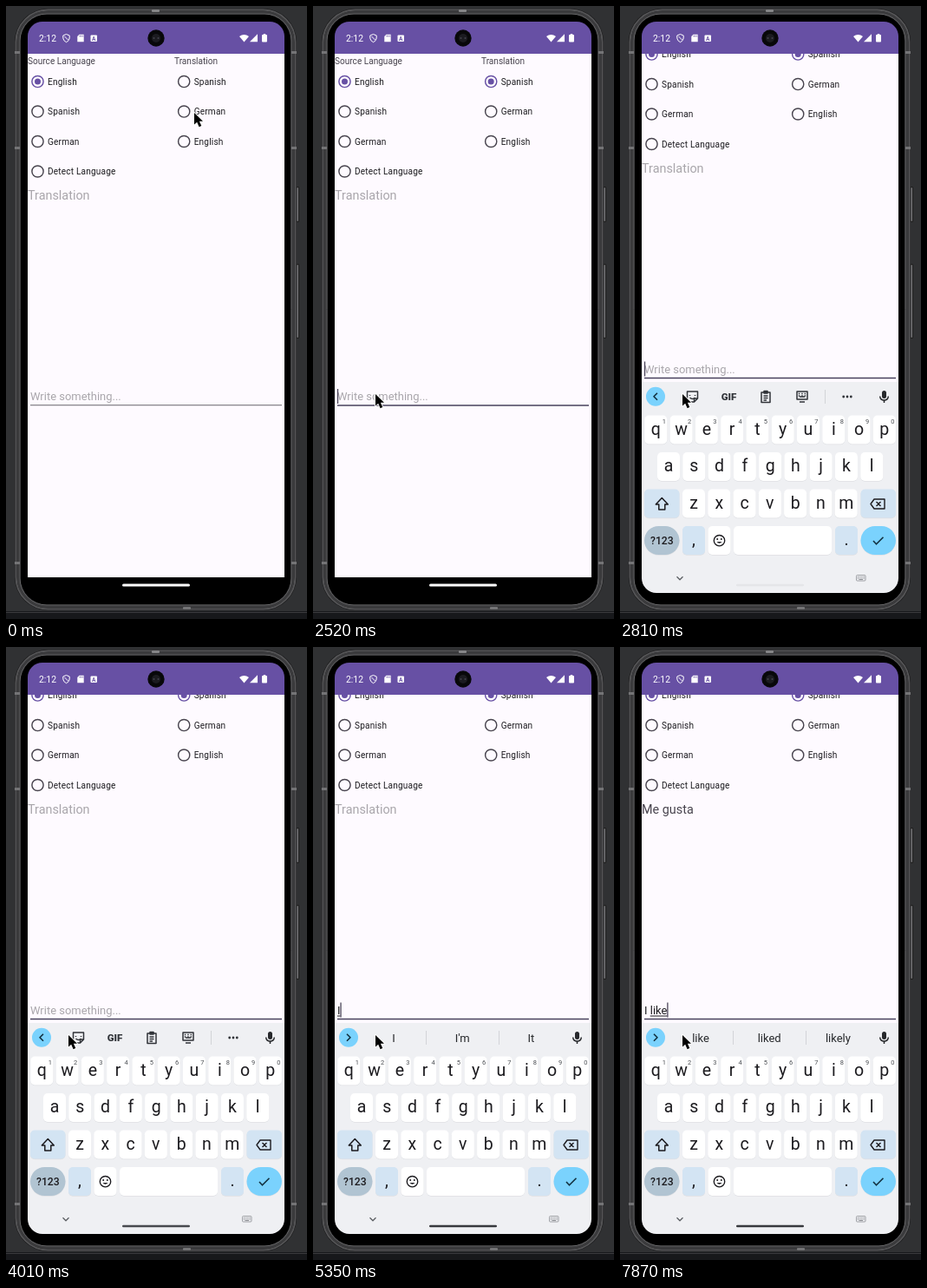
Animation, 347 px wide and 706 px high, one loop 8000 ms. Source, as an HTML page with a canvas:

```html
<!DOCTYPE html>
<html lang="en">
<head>
<meta charset="utf-8">
<style>
html, body { margin: 0; width: 100%; height: 100%; overflow: hidden; background: #303133; }
canvas { display: block; width: 347px; height: 706px; }
</style>
</head>
<body>
<canvas></canvas>
<script>
const W = 347, H = 706, LOOP = 8000;
const canvas = document.querySelector('canvas');
const c = canvas.getContext('2d');
const dpr = window.devicePixelRatio || 1;
canvas.width = W * dpr;
canvas.height = H * dpr;

const PURPLE = '#6750a4', INK = '#1c1b1f', SOFT = '#49454f', HINT = '#a9a6ab';
const PAPER = '#fefaff', BLUE = '#7ad2fd', PALE = '#d3e4f3';

// Each track lists [start time, value]; a value holds until the next one.
const pointer = [[0, [217, 123]], [150, [220, 124]], [300, [221, 117]], [450, [217, 104]],
  [590, [212, 91]], [740, [210, 84]], [1790, [184, 154]], [1940, [109, 352]], [2080, [72, 447]]];
const dot = [[0, 0], [1640, 2], [1790, 3.5]];
const caret = [[0, 0], [2370, 1], [2960, 0], [3410, 1], [4010, 0], [4450, 1], [5650, 0],
  [5950, 1], [6690, 0], [7290, 1]];
const drop = [[0, 243], [2660, 70], [2810, 0]];
const handle = [[0, 0], [2810, .06], [2960, .1], [3110, .25], [3410, .5], [3710, .75], [4010, .9],
  [4300, .96], [4450, 1]];
const typed = [[0, ''], [5050, 'I'], [5950, 'I '], [6240, 'I l'], [7290, 'I li'], [7440, 'I lik'], [7580, 'I like']];
const output = [[0, ''], [6090, 'Yo'], [6240, 'Yo l'], [7440, 'Yo li'], [7580, 'Yo lik'], [7730, 'Me gusta']];
const hints = [[0, null], [5200, ['I', "I'm", 'It']], [5950, ['am', 'have', 'will']],
  [6240, ['l', 'love']], [7440, ['li', 'like', 'little']], [7580, ['lik', 'like', 'liked']],
  [7730, ['like', 'liked', 'likely']]];

function at(track, t) {
  let value;
  for (const [start, v] of track) if (t >= start) value = v;
  return value;
}

function text(s, x, y, size, color = INK, { align = 'left', weight = 400, gap = 0 } = {}) {
  c.font = `${weight} ${size}px Roboto, sans-serif`;
  c.letterSpacing = gap + 'px';
  c.textAlign = align;
  c.fillStyle = color;
  c.fillText(s, x, y);
  return c.measureText(s).width;
}
function box(x, y, w, h, color, r = 0) {
  c.fillStyle = color;
  c.beginPath();
  c.roundRect(x, y, w, h, r);
  c.fill();
}
function ring(x, y, w, h, r, color, width = 1) {
  c.strokeStyle = color;
  c.lineWidth = width;
  c.beginPath();
  c.roundRect(x, y, w, h, r);
  c.stroke();
}
function disc(x, y, r, color) {
  box(x - r, y - r, 2 * r, 2 * r, color, r);
}
function path(d, x, y, { fill, stroke, width = 1.4 } = {}) {
  const p = new Path2D(d);
  c.save();
  c.translate(x, y);
  if (stroke) {
    c.strokeStyle = stroke;
    c.lineWidth = width;
    c.lineJoin = 'round';
    c.stroke(p);
  }
  if (fill) {
    c.fillStyle = fill;
    c.fill(p);
  }
  c.restore();
}

function phone() {
  box(0, 0, W, H, '#303133');
  box(0, 697, W, 9, '#17181b');
  box(0, 698, W, 1, '#3b3b3e');
  for (const [y, h] of [[208, 41], [297, 86]]) {
    box(334, y, 4, h, '#202020', 1);
    box(335.5, y + 1, 1.5, h - 2, '#77777a', 1);
  }
  box(10, 3, 325, 693, '#1b1b1c', 38);
  ring(11.5, 4.5, 322, 690, 37, '#555557', 2);
  ring(14, 7, 317, 685, 34, '#3b3b3d', 3);
  ring(16, 9, 313, 681, 31, '#69696b', 1);
  box(17, 10, 311, 679, '#000', 30);
  for (const y of [52, 162, 640]) {
    box(10, y, 6, 3, '#747476');
    box(329, y, 6, 3, '#747476');
  }
  box(168, 4, 9, 3, '#858587', 1);
  box(204, 692, 9, 3, '#747476', 1);
}

function statusBar() {
  box(25, 18, 296, 37, PURPLE);
  text('2:12', 38, 41, 10.4, '#fff');
  path('M0-4.5 3.7-3V0Q3.5 3 0 4.7Q-3.5 3-3.7 0V-3Z M-2-2 2 2', 69.5, 37, { stroke: '#fff', width: 1 });
  path('M-1.5-4.2H3.7V4.2H-3.7V-2Z', 86, 37, { fill: '#fff' });
  for (const x of [84.5, 86.2, 87.9]) box(x, 33.8, .8, 1.8, PURPLE);
  box(97.5, 33.5, 7.5, 7.5, '#fff', 1);
  text('A', 101.25, 39.8, 6.5, PURPLE, { align: 'center', weight: 700 });
  path('M-5.5-2Q0-6.2 5.5-2L0 4.5Z', 274.5, 37, { fill: '#fff' });
  path('M4.5-4.5V4.5H-4.5Z', 285.5, 36.8, { fill: '#fff' });
  box(295, 33, 6, 8.5, '#fff', 1);
  box(296.8, 32, 2.4, 2, '#fff');
  disc(173, 37, 9.7, '#08080a');
  disc(173, 37, 5, '#1b1b20');
  for (const x of [170.5, 175.5]) disc(x, 37, 1, '#43434c');
}

function radio(x, y, label, r = 0) {
  ring(x - 6.6, y - 6.6, 13.2, 13.2, 6.6, r ? PURPLE : SOFT, 1.45);
  if (r) disc(x, y, r, PURPLE);
  text(label, x + 11.5, y + 3.6, 10.08, INK, { gap: .18 });
}

function page(t, shift) {
  const line = typed.length && at(typed, t);
  const result = at(output, t);
  c.save();
  c.beginPath();
  c.rect(25, 55, 296, 603);
  c.clip();
  box(25, 55, 296, 603, PAPER);
  c.translate(0, -shift);
  text('Source Language', 25, 66.5, 10.08, SOFT);
  text('Translation', 194, 66.5, 10.08, SOFT);
  ['English', 'Spanish', 'German', 'Detect Language'].forEach((s, i) => radio(36.5, 87 + 34.5 * i, s, i ? 0 : 3.5));
  ['Spanish', 'German', 'English'].forEach((s, i) => radio(205.2, 87 + 34.5 * i, s, i ? 0 : at(dot, t)));
  text(result || 'Translation', 25, 223, 14.4, result ? SOFT : HINT);

  const focused = t >= 2370;
  box(28, 459.3, 290, focused ? 1.5 : 1, focused ? '#47405c' : '#66636b');
  let end = 28;
  if (line) {
    end += text(line, 28, 454.3, 12.96);
    const word = line.split(' ').pop();
    const w = c.measureText(word).width;
    if (word) box(end - w, 456, w, 1, INK);
  } else {
    text('Write something...', 28, 454.3, 12.96, HINT);
  }
  if (at(caret, t)) box(end - .1, 441, 1.3, 17, '#4a4458');
  c.restore();
}

function key(x, y, w, label, color = '#fff', r = 5) {
  box(x, y + .8, w, 33, '#dfe0e4', r);
  box(x, y, w, 33, color, r);
  if (label) text(label, x + w / 2, y + 22, 19.5, INK, { align: 'center' });
}

function toolIcons() {
  const pen = { stroke: '#303338', width: 1.5 };
  path('M-6-6H6V2L2 6H-6Z M6 2H2V6 M-3-2V-1 M3-2V-1 M-3 1Q0 4 3 1', 83.5, 450, pen);
  text('GIF', 125.5, 454, 11.5, '#303338', { align: 'center', weight: 900 });
  path('M-5-5H5V6.5H-5Z M-2-6.5H2V-4H-2Z M-2.5-1H2.5 M-2.5 1.5H2.5 M-2.5 4H1', 168, 450, pen);
  path('M-6-6H6V3H-6Z M-3 0H3 M-3 6H3', 210, 450, pen);
  for (let i = 0; i < 6; i++) box(205.8 + i % 3 * 3.4, 445.8 + (i > 2) * 2.4, 1.5, 1.5, '#303338');
  box(236, 442, 1, 16, '#d2d4d8');
  for (const x of [257.7, 262, 266.3]) disc(x, 450, 1.4, '#303338');
}

function emojis() {
  const heart = 'M0 5C-9-1-4-7 0-3C4-7 9-1 0 5Z';
  path(heart, 231, 452, { fill: '#f0438e' });
  path('M0 4C-7-1-3-6 0-2.5C3-6 7-1 0 4Z', 237.5, 446.5, { fill: '#f770ad' });
  box(251, 442, 1, 16, '#d2d4d8');
  disc(270.5, 450, 7, '#fcc934');
  path('M-4.5-2Q-3-3 -1.5-1.5 M0 0Q3 .5 1 2Q3 3 0 4', 270.5, 450, { stroke: '#65431b', width: 1 });
  disc(273.3, 448, 1.1, '#65431b');
  path('M0 2.6C-4 0-2-3 0-1.3C2-3 4 0 0 2.6Z', 275.5, 453.5, { fill: '#ea3341' });
}

function toolbar(words) {
  disc(41, 449.7, 11, BLUE);
  path(words ? 'M-2-4 2 0-2 4' : 'M2-4-2 0 2 4', 41, 449.7, { stroke: '#12303f', width: 1.6 });
  if (words) {
    words.forEach((s, i) => text(s, 93 + 79.2 * i, 454.5, 13, '#26282b', { align: 'center' }));
    for (const x of [130, 214]) box(x, 442, 1, 16, '#d2d4d8');
    if (words.length < 3) emojis();
  } else {
    toolIcons();
  }
  box(302, 443, 5, 9, '#26282b', 2.5);
  path('M-4.8-.5Q-4.5 4 0 4T4.8-.5 M0 4V7', 304.5, 450, { stroke: '#26282b', width: 1.5 });
}

function keyboard(t) {
  box(25, 433, 296, 243, '#eff0f3');
  toolbar(at(hints, t));
  [...'qwertyuiop'].forEach((s, i) => {
    const x = 28.3 + 29.28 * i;
    key(x, 471.5, 26, s);
    text((i + 1) % 10, x + 22.5, 480.5, 7.5, '#4b4e53', { align: 'center' });
  });
  [...'asdfghjkl'].forEach((s, i) => key(43 + 29.28 * i, 514, 26, s));
  [...'zxcvbnm'].forEach((s, i) => key(72 + 29.28 * i, 556.5, 26, s));

  key(28, 556.5, 40.5, '', PALE);
  path('M0-7 7 .5H3.5V6.5H-3.5V.5H-7Z', 48.3, 573.5,
    { stroke: INK, width: 1.5, fill: t >= 5050 && t < 5200 ? INK : undefined });
  key(277.5, 556.5, 40.5, '', PALE);
  path('M-8 0-4-5.5H8V5.5H-4Z M-1.5-2.5 3.5 2.5 M3.5-2.5-1.5 2.5', 297, 573.5, { stroke: INK, width: 1.4 });

  key(28, 599, 40.5, '', '#b1c4d2', 16.5);
  text('?123', 48.3, 620, 12.2, INK, { align: 'center', weight: 500 });
  key(72, 599, 26, ',', PALE);
  key(101.5, 599, 26, '');
  ring(108.3, 609.5, 12.4, 12.4, 6.2, INK, 1.4);
  for (const x of [112.2, 116.8]) disc(x, 614, 1, INK);
  path('M-3 1.5Q0 5 3 1.5Z', 114.5, 615.5, { fill: INK });
  key(131, 599, 113, '');
  key(248, 599, 26, '.', PALE);
  key(277.5, 599, 40.5, '', BLUE, 16.5);
  path('M-5.5 0-2 3.8 6-4.2', 297.5, 616, { stroke: '#12303f', width: 1.6 });

  path('M-3.5-1.7 0 1.8 3.5-1.7', 69, 659, { stroke: '#5c5f63', width: 1.3 });
  ring(272.5, 655.5, 10.5, 6.5, 1, '#8a8c91', .8);
  for (let i = 0; i < 8; i++) box(274 + i % 4 * 2.2, 657 + (i > 3) * 1.8, 1, 1, '#777a7f');
  box(275.5, 660.3, 4.5, .8, '#777a7f');
  box(134, 665.7, 78, 2.6, `rgba(55,57,61,${at(handle, t)})`, 1.3);
}

function arrow([x, y]) {
  path('M0 0V13.5L3.2 10.7 5.6 16.2 8.3 15 5.9 9.8H10Z', x, y, { stroke: '#fff', width: 1.8, fill: '#000' });
}

function draw(now) {
  const t = now % LOOP;
  const slide = at(drop, t);
  c.setTransform(dpr, 0, 0, dpr, 0, 0);
  phone();
  c.save();
  c.beginPath();
  c.roundRect(25, 18, 296, 658, 17);
  c.clip();
  box(25, 18, 296, 658, '#000');
  page(t, slide ? 0 : 31.5);
  statusBar();
  box(134, 665.5, 78, 3, '#fff', 1.5);
  if (slide < 243) {
    c.translate(0, slide);
    keyboard(t);
  }
  c.restore();
  arrow(at(pointer, t));
  requestAnimationFrame(draw);
}
requestAnimationFrame(draw);
</script>
</body>
</html>
```
